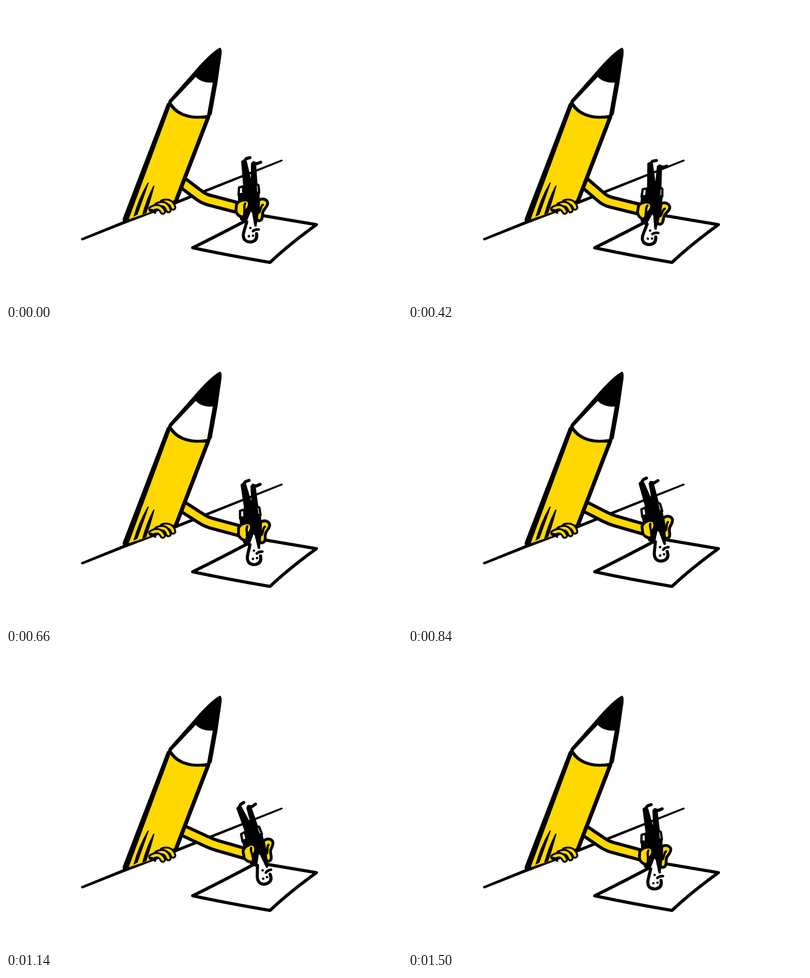
Animation of 768x576 px, one loop 1.56 s. Source, as an HTML page with a canvas:

```html
<!DOCTYPE html>
<html lang="en">
<head>
<meta charset="utf-8">
<title>Pencil at work</title>
<style>
  html, body { margin: 0; width: 100%; height: 100%; overflow: hidden; background: #fff; }
  canvas { display: block; }
</style>
</head>
<body>
<canvas id="stage" width="768" height="576"></canvas>
<script>
const ctx = document.getElementById('stage').getContext('2d');
const YELLOW = '#ffd800', BLACK = '#000', WHITE = '#fff';
const LOOP = 1560, STEP = 60;
const PIVOT = { x: 475, y: 395 };

// Hand pose: time, x offset, y offset, rotation in degrees
const poses = [
  [0, 0, 0, 0],
  [180, -4.6, 4.7, 5.7],
  [300, -3.5, 6, 6.8],
  [420, -0.8, 5.4, 5.5],
  [660, 4.6, -2.7, -3.6],
  [840, 8, -9, -10.7],
  [960, 11, -12.3, -13.5],
  [1140, 14, -10, -15],
  [1500, 2.7, -2, -2.4]
];

function fill(d, color) {
  ctx.fillStyle = color;
  ctx.fill(new Path2D(d));
}

function line(d, width, color = BLACK) {
  ctx.strokeStyle = color;
  ctx.lineWidth = width;
  ctx.stroke(new Path2D(d));
}

function shape(d, color, width) {
  fill(d, color);
  line(d, width);
}

function dot(x, y, r) {
  ctx.fillStyle = BLACK;
  ctx.beginPath();
  ctx.arc(x, y, r, 0, Math.PI * 2);
  ctx.fill();
}

// Pose number i, continued periodically in both directions
function poseAt(i) {
  const n = poses.length, lap = Math.floor(i / n);
  const [t, ...values] = poses[i - lap * n];
  return { t: t + lap * LOOP, values };
}

// Closed smooth curve through the poses
function samplePose(time) {
  let i = poses.length - 1;
  while (poses[i][0] > time) i--;
  const [a, b, c, d] = [i - 1, i, i + 1, i + 2].map(poseAt);
  const span = c.t - b.t, u = (time - b.t) / span;
  const [dx, dy, deg] = b.values.map((from, k) => {
    const to = c.values[k];
    const m0 = (to - a.values[k]) / (c.t - a.t) * span;
    const m1 = (d.values[k] - from) / (d.t - b.t) * span;
    return from + u * (m0 + u * (3 * (to - from) - 2 * m0 - m1
      + u * (m0 + m1 - 2 * (to - from))));
  });
  return { dx, dy, angle: deg * Math.PI / 180 };
}

function drawDesk() {
  fill('M146 452 L229 418 L328 380 L534 299 Q538 299 536 302 L329 386 L230 424 L149 456 Q144 456 146 452Z', BLACK);
  shape('M362 470.5 Q422 441 487 406 Q545 416 602 425.5 Q549 464 512 499 Q430 485 362 470.5Z', WHITE, 6);
}

function drawArm({ dx, dy, angle }) {
  const cos = Math.cos(angle), sin = Math.sin(angle);
  const wrist = {
    x: PIVOT.x + dx - 23 * cos + 2 * sin,
    y: PIVOT.y + dy - 23 * sin - 2 * cos
  };
  const shoulder = { x: 340, y: 342 };
  const elbow = { x: 383.5 + 1.15 * (wrist.x - 452), y: 375 + 1.3 * (wrist.y - 393) };
  const toward = (p, k) => `${elbow.x + (p.x - elbow.x) * k} ${elbow.y + (p.y - elbow.y) * k}`;
  const path = `M${shoulder.x} ${shoulder.y} L${toward(shoulder, 0.2)}`
    + ` Q${elbow.x} ${elbow.y} ${toward(wrist, 0.15)} L${wrist.x} ${wrist.y}`;
  line(path, 25.5);
  line(path, 13, YELLOW);
}

function drawPencil() {
  // Body
  fill('M312 190 L319 184 L397 210 L396 217 L332 384 L275 406 L228 420 Q225 418 227 412Z', BLACK);
  fill('M320 192 Q344 221 387 219 L326 378 L280 401 L238 415Z', YELLOW);
  // Pleats
  fill('M277 344 Q268 370 255 406 L247 410 Q257 374 274 345Q276 342 277 344Z', BLACK);
  fill('M288 350 Q281 378 272 403 L264 406 Q272 376 285 351Q287 348 288 350Z', BLACK);
  // Sharpened end
  fill('M415 81 Q419 82 418 94 L410 150 L399 211 Q394 217 389 215 L317 189 Q312 189 317 182 L362 131 Q397 90 415 81Z', BLACK);
  fill('M321 188 L368 138 Q379 150 401 149 L390 212 C356 218 332 207 321 188Z', WHITE);
  line('M318 190 C328 210 356 222 392 215', 4.5);
}

function drawRestingHand() {
  const fingers = [
    'M304 382 Q320 378 324 392',
    'M293 388 Q309 380 315 397',
    'M282 395 Q297 386 304 400'
  ];
  for (const finger of fingers) {
    line(finger, 12.5);
    line(finger, 5, YELLOW);
  }
  line('M279 397 Q285 397 289 402', 5);
}

function drawFigure() {
  // Shoes and legs
  line('M461 303 L466 297 L473 295', 6);
  line('M480 305 L486 307 L494 304', 6);
  fill('M456 302 Q461 297 467 302 L475 336 L475 306 Q480 300 485 306 L488 350 L460 350Z', BLACK);
  // Sleeves and jacket
  shape('M452 353 L460 351 L460 366 L451 368Z', WHITE, 4.5);
  shape('M483 349 Q490 345 490 352 L491 364 L485 364Z', WHITE, 4.5);
  fill('M461 335 L486 335 L487 361 L492 363 L491 405 L486 426 L466 424 L454 416 L450 385 L450 364 L461 364Z', BLACK);
  // Head
  fill('M475 400 L466 421 L461 440 Q457 450 464 458 Q473 463 482 459 Q488 453 487 443 L482 425 L479 405Z', WHITE);
  line('M467 420 L462 437 Q458 449 463 455 Q468 460 476 459 Q488 457 486 443', 6);
  line('M480 404 L484 427', 5);
  line('M479 438 Q484 434 490 435', 5);
  dot(474, 432, 2.4);
  dot(471, 448, 2.4);
  dot(479, 447, 2.4);
}

function drawGrip() {
  shape('M447 386 C452 377 466 375 471 380 C474 387 470 394 466 398 C463 402 463 407 460 411 C453 411 446 404 446 398Z', YELLOW, 5.5);
  line('M464 384 C460 390 464 395 462 402', 4.5);
  shape('M490 378 C497 373 506 376 507.5 383 C508 390 501 394 499 399 C496 405 499 411 495 416 C490 420 486 417 486 412 C486 406 489 400 489 393Z', YELLOW, 5.5);
  line('M498 387 C493 390 495 396 491 402', 4.5);
}

function draw(time) {
  const pose = samplePose(time);
  ctx.fillStyle = WHITE;
  ctx.fillRect(0, 0, 768, 576);
  ctx.lineCap = ctx.lineJoin = 'round';
  drawDesk();
  drawArm(pose);
  drawPencil();
  drawRestingHand();
  ctx.save();
  ctx.translate(PIVOT.x + pose.dx, PIVOT.y + pose.dy);
  ctx.rotate(pose.angle);
  ctx.translate(-PIVOT.x, -PIVOT.y);
  drawFigure();
  drawGrip();
  ctx.restore();
}

let start;
function tick(now) {
  start ??= now;
  draw(Math.floor((now - start) % LOOP / STEP) * STEP);
  requestAnimationFrame(tick);
}
draw(0);
requestAnimationFrame(tick);
</script>
</body>
</html>
```
